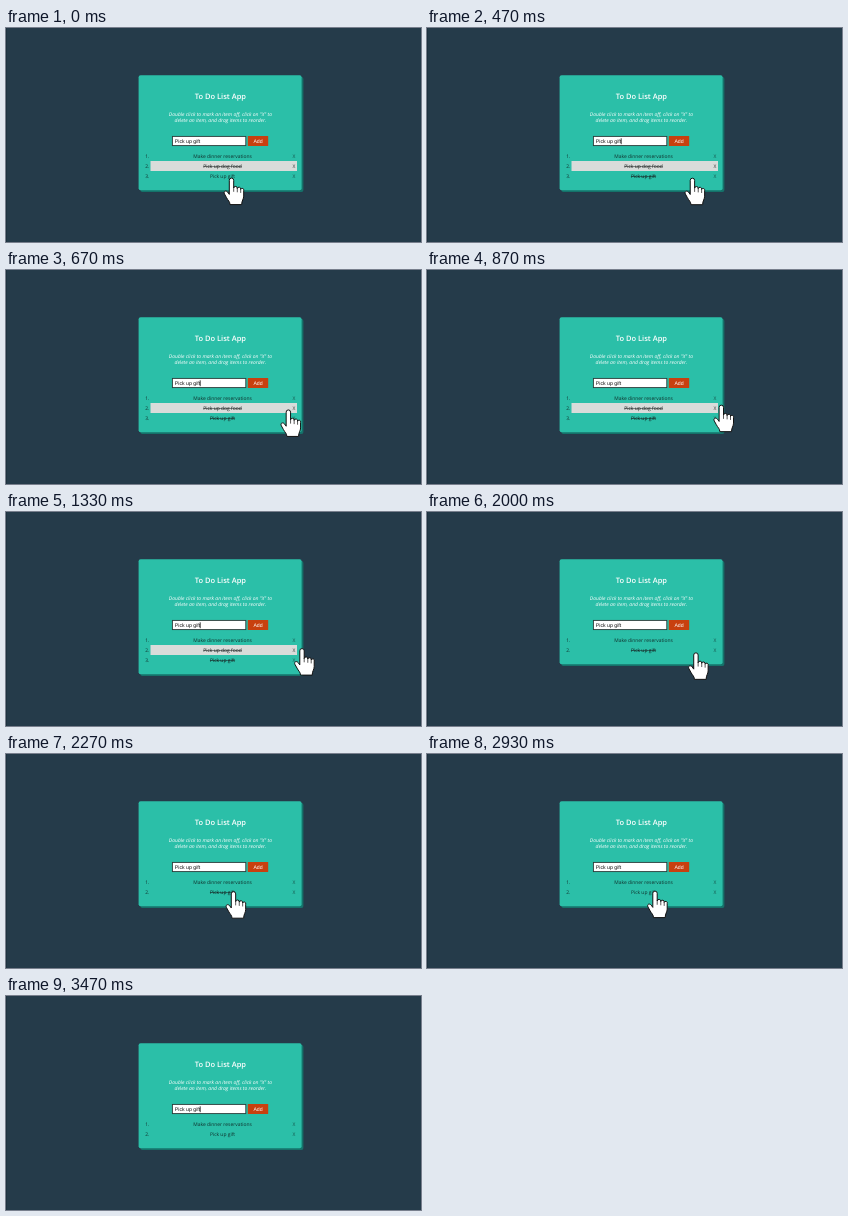
An HTML page that plays this animation: 415 px wide and 214 px high, repeating every 3.67 s.

```html
<!DOCTYPE html>
<html lang="en">
<head>
<meta charset="utf-8">
<title>To Do List App</title>
<style>
  html, body { margin: 0; width: 100%; height: 100%; overflow: hidden; background: #253b4a; }
  svg { display: block; width: 415px; height: 214px; }
  text { font-family: "Open Sans", sans-serif; font-size: 4.95px; fill: #10302c; text-rendering: geometricPrecision; }
  .mid { text-anchor: middle; }
  .title { font-size: 7.5px; font-weight: 600; fill: #fff; }
  .hint { font-size: 5.03px; font-style: italic; fill: #fff; }
  .field { font-family: "Liberation Sans", Arial, sans-serif; font-size: 5.2px; fill: #111; }
  .add { fill: #fff; }
  .close { fill: #15534b; }
  .dark { fill: #333; }
  .struck { text-decoration: line-through; fill: #151c1b; }
</style>
</head>
<body>
<svg viewBox="0 0 415 214">
  <defs>
    <filter id="soft"><feGaussianBlur stdDeviation=".6"/></filter>
  </defs>
  <rect width="415" height="214" fill="#253b4a"/>
  <path d="M.4 0V214" stroke="#1e313e" stroke-width=".8"/>

  <rect id="shadow" x="134.4" y="49" width="163" rx="2" fill="#15726a" filter="url(#soft)"/>
  <rect id="card" x="132.6" y="47.2" width="163" rx="2" fill="#2bbfa8"/>

  <text class="mid title" x="214.4" y="71.2">To Do List App</text>
  <text class="mid hint" x="214.4" y="88">Double click to mark an item off, click on "X" to</text>
  <text class="mid hint" x="214.4" y="94.2">delete an item, and drag items to reorder.</text>

  <rect x="166.4" y="108.4" width="73.4" height="9.2" fill="#fff" stroke="#2b3a38" stroke-width=".9"/>
  <text class="field" x="168.8" y="114.9">Pick up gift</text>
  <path id="caret" d="M194.2 110.3V116.2" stroke="#111" stroke-width=".8"/>
  <rect x="241.8" y="108" width="20.4" height="10" rx=".5" fill="#c8400f"/>
  <text class="mid field add" x="252" y="114.9">Add</text>

  <g id="list"></g>

  <g id="hand" stroke="#111" stroke-width="1" stroke-linejoin="round" stroke-linecap="round">
    <path fill="#fff" d="M-2.2 16.5V2.8a2.2 2.2 0 0 1 4.4 0V10.5a1.8 1.8 0 0 1 3.6 .5a1.7 1.7 0 0 1 3.4 .9a1.6 1.6 0 0 1 3 1.2v5.5c0 3-2 4.5-2 8.5H-1.5c0-3-2-4-3.5-7l-2-3.6c-1.3-2.6 1.2-4 2.9-2.2z"/>
    <path fill="none" stroke-width=".7" d="M2.2 10.5v3.4M5.8 11v3.4M9.2 12v3"/>
  </g>
  <path id="beam" d="M-4.5 -8.5H-1.5L0 -7.5L1.5 -8.5H4.5M-4.5 8.5H-1.5L0 7.5L1.5 8.5H4.5M0 -7.5V7.5" fill="none" stroke="#000" stroke-width="1.8"/>
</svg>
<script>
const LOOP = 3670, STEP = 1000 / 15, BLINK = 530;
const ROW = 10, LIST_TOP = 123;
const DELETE_AT = 1800, STRIKE_AT = 66, UNSTRIKE_AT = 2860, LEAVE_AT = 3460;

// Pointer stops: time, x, y of the fingertip.
const pointer = [
  [0, 225.5, 149.5], [200, 225.5, 149.5], [270, 231, 149.6], [470, 266, 149.6],
  [600, 278, 142], [730, 286.5, 136.8], [870, 294.5, 134.5], [1000, 296, 136],
  [1800, 296, 136], [1870, 293, 137], [2070, 256, 142], [2270, 227, 137],
  [2400, 228, 136.5], [3330, 228, 136.5], [3400, 242, 136.5]
];

const $ = id => document.getElementById(id);

function add(parent, tag, attrs, text = "") {
  const node = document.createElementNS("http://www.w3.org/2000/svg", tag);
  for (const key in attrs) node.setAttribute(key, attrs[key]);
  node.textContent = text;
  return parent.appendChild(node);
}

function makeItem(label, marked) {
  const group = add($("list"), "g", {});
  if (marked) add(group, "rect", { x: 144.5, y: 0, width: 146.5, height: ROW, fill: "#d9dcda" });
  const number = add(group, "text", { x: 139.2, y: 7 });
  const text = add(group, "text", { x: 216.5, y: 7, class: "mid" }, label);
  add(group, "text", { x: 288, y: 7, class: "mid close" + (marked ? " dark" : "") }, "X");
  return { group, number, text };
}

const [dinner, food, gift] = [
  makeItem("Make dinner reservations"),
  makeItem("Pick up dog food", true),
  makeItem("Pick up gift")
];
food.text.classList.add("struck");

function show(node, visible) {
  node.setAttribute("visibility", visible ? "visible" : "hidden");
}

function place(node, x, y) {
  node.setAttribute("transform", `translate(${x} ${y})`);
}

function pointerAt(t) {
  const next = pointer.findIndex(stop => stop[0] > t);
  if (next < 0) return pointer[pointer.length - 1].slice(1);
  const [t0, x0, y0] = pointer[next - 1], [t1, x1, y1] = pointer[next];
  const k = (t - t0) / (t1 - t0);
  return [x0 + (x1 - x0) * k, y0 + (y1 - y0) * k];
}

function render(time) {
  // The picture advances 15 times per second.
  const t = Math.floor((time % LOOP + 5) / STEP) * STEP + 0.1;
  const deleted = t >= DELETE_AT;

  const items = deleted ? [dinner, gift] : [dinner, food, gift];
  show(food.group, !deleted);
  items.forEach((item, i) => {
    place(item.group, 0, LIST_TOP + i * ROW);
    item.number.textContent = `${i + 1}.`;
  });
  gift.text.classList.toggle("struck", t >= STRIKE_AT && t < UNSTRIKE_AT);

  const height = 85 + items.length * ROW;
  $("card").setAttribute("height", height);
  $("shadow").setAttribute("height", height);
  show($("caret"), t >= 210 && Math.floor((t - 210) / BLINK) % 2 === 0);

  const [x, y] = pointerAt(t);
  const onList = !deleted || x < 291;
  show($("hand"), onList && t < LEAVE_AT);
  show($("beam"), !onList);
  place($("hand"), x, y);
  place($("beam"), x + 4.5, y + 13);
}

const start = performance.now();
function tick() {
  render(performance.now() - start);
  requestAnimationFrame(tick);
}
tick();
</script>
</body>
</html>
```
